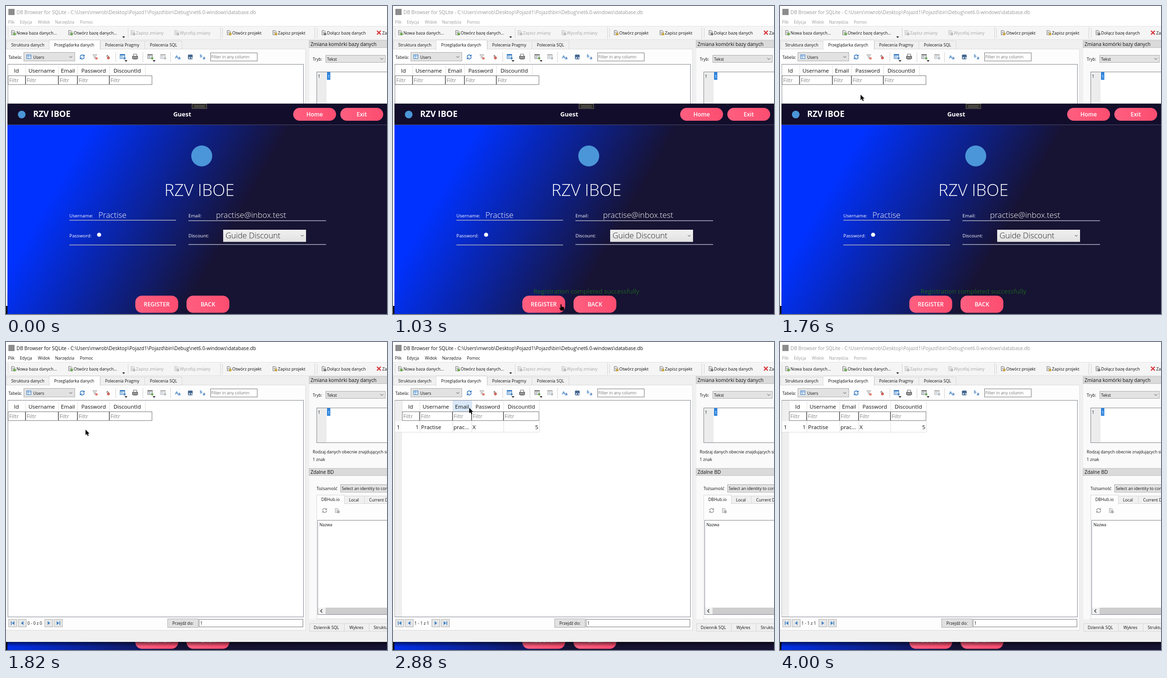
Animation of 800 by 647 pixels, one loop 4.03 s. Source, as an HTML page:

```html
<!DOCTYPE html>
<html lang="pl">
<head>
<meta charset="utf-8">
<title>Registration demo</title>
<style>
html, body { margin: 0; width: 100%; height: 100%; overflow: hidden; background: #f0f0f0; }
svg { display: block; width: 100vw; height: 100vh; font-family: "Open Sans", "Noto Sans", sans-serif; }
text { white-space: pre; }
</style>
</head>
<body>
<svg id="stage" viewBox="0 0 800 647" preserveAspectRatio="none"></svg>
<script>
const INK = '#111', MUTE = '#a2a2a2', LINE = '#828790', SOFT = '#d4d4d4', BLUE = '#3b7fc4', FACE = '#f0f0f0';
const NAME = 'Practise', BRAND = 'RZV IBOE';

const text = (x, y, s, size = 8.7, fill = INK, more = '') =>
  `<text x="${x}" y="${y}" font-size="${size}" fill="${fill}" ${more}>${s}</text>`;
const rect = (x, y, w, h, fill, stroke = 'none', rx = 0) =>
  `<rect x="${x}" y="${y}" width="${w}" height="${h}" fill="${fill}" stroke="${stroke}" rx="${rx}"/>`;
const path = (d, stroke, width = 1, fill = 'none') =>
  `<path d="${d}" stroke="${stroke}" stroke-width="${width}" fill="${fill}"/>`;
const circle = (x, y, r, fill) => `<circle cx="${x}" cy="${y}" r="${r}" fill="${fill}"/>`;
const group = (id, body) => `<g id="${id}">${body}</g>`;
const chevron = (x, y) => path(`M${x - 3} ${y - 1.5}l3 3 3-3`, '#444');
const drop = (x, y) => path(`M${x - 3} ${y}h6l-3 3z`, 'none', 0, INK);
const MID = 'text-anchor="middle"', BOLD = 'font-weight="700"';

// Toolbar glyphs: a sheet with a badge, a grid with a badge
const sheet = (x, y, badge, line = '#777') =>
  path(`M${x + 1.5} ${y + .5}h5l2 2v7h-7z`, line, 1, '#eee') + path(`M${x + 3} ${y + 4}h4m-4 2h4`, line, .7) +
  circle(x + 8, y + 8, 2.8, badge);
const grid = (x, y, tone, badge) =>
  rect(x - 5.5, y - 5.5, 10, 9, '#e8f0f8', tone) + rect(x - 5, y - 5, 9, 2, tone) +
  path(`M${x - 5} ${y}h9M${x - 2} ${y - 3}v6`, tone, .7) + circle(x + 4, y + 3, 2.4, badge);
const refresh = (x, y, c) =>
  path(`M${x - 4} ${y}a4 4 0 0 1 7-3m1 3a4 4 0 0 1-7 3`, c, 1.7) +
  path(`M${x + 5} ${y - 5.5}v4.5h-4.5zM${x - 5} ${y + 5.5}v-4.5h4.5z`, 'none', 0, c);

function titleBar() {
  const file = 'C:\\Users\\mwrob\\Desktop\\Pojazd1\\Pojazd\\bin\\Debug\\net6.0-windows\\database.db';
  const menu = [[4, 'Plik'], [29, 'Edycja'], [67, 'Widok'], [103, 'Narzędzia'], [155, 'Pomoc']];
  return rect(0, 0, 800, 43, '#fff') + rect(5, 6, 13, 13, '#8c8c8c') +
    group('title', text(22, 17, 'DB Browser for SQLite - ' + file, 10.15, 'inherit') +
      menu.map(([x, s]) => text(x, 37, s, 8.7, 'inherit')).join(''));
}

function toolBar() {
  const items = [[22, 'Nowa baza danych...', '#6aa84f'], [142, 'Otwórz bazę danych...', '#6aa84f'],
    [273, 'Zapisz zmiany'], [365, 'Wycofaj zmiany'], [475, 'Otwórz projekt', '#c9a53c'],
    [571, 'Zapisz projekt', '#c9a53c'], [674, 'Dołącz bazę danych', '#777']];
  return rect(0, 43, 800, 28, '#f5f5f5') + path('M0 70.5H800M0 42.5H800', '#e2e2e2') +
    items.map(([x, s, badge]) => sheet(x - 12, 51, badge || '#bbb', badge ? '#777' : '#bbb') +
      text(x, 60, s, 8.9, badge ? INK : MUTE)).join('') +
    drop(247, 64) + path('M450.5 44V69M648.5 44V69', SOFT) +
    path('M4.5 46V67M256.5 46V67M454.5 46V67M653.5 46V67', SOFT, 1) +
    path('M779 52l8 8m0-8l-8 8', '#d8333a', 2.4) + text(790, 60, 'Za', 8.9);
}

function tabs() {
  const idle = [[0, 90, 'Struktura danych', 11], [198, 93, 'Polecenia Pragmy', 208], [291, 78, 'Polecenia SQL', 302]];
  return rect(0, 71, 800, 559, FACE) + rect(-1, 90.5, 630, 515, '#fdfdfd', '#dcdcdc') +
    idle.map(([x, w, s, tx]) => rect(x + .5, 73.5, w, 17, FACE, '#d9d9d9') + text(tx, 85, s)).join('') +
    rect(90.5, 71.5, 107, 20, '#fdfdfd', '#d9d9d9') + rect(91, 90, 106, 3, '#fdfdfd') +
    text(101, 84.5, 'Przeglądarka danych');
}

function tableBar() {
  return text(5, 110.5, 'Tabela:') +
    `<rect id="combo" x="37.5" y="97.5" width="107" height="18" fill="#e2e2e2" stroke="#adadad"/>` +
    rect(43.5, 102.5, 9, 8, '#e8f1fa', BLUE) + path('M44 105h9M47 103v8', BLUE, .8) +
    text(57, 110.5, 'Users') + chevron(136, 107) +
    group('hot', rect(147, 94, 26, 26, '#e4effa')) + refresh(160, 107, BLUE) +
    path('M182 102h9l-3 4v5l-3-2v-3z', '#aaa', 1, '#ddd') + circle(190, 110, 2.5, '#e07a70') +
    path('M210 106l3-4 3 4z', 'none', 0, '#999') + circle(215, 109, 3, '#c9665c') +
    grid(245, 107, BLUE, '#5a8fc8') + drop(252, 114) +
    rect(265.5, 105.5, 11, 5, '#999', '#555') + path('M267.5 105v-4h7v4M267 112h8', '#666') +
    grid(303, 107, '#888', '#6aa84f') + drop(311, 114) + grid(330, 107, '#bbb', '#bbb') +
    path('M230.5 97V118M287.5 97V118M345.5 97V118', SOFT) +
    text(355, 110, 'A', 9.5, BLUE, BOLD) + text(361, 112, 'a', 9, '#2f6fb4', BOLD) +
    rect(382, 102, 10, 10, '#47688f', 'none', 2) + circle(385, 109, 1.8, '#cde') + circle(390, 109, 1.8, '#cde') +
    text(407, 108, 'b', 8, BLUE, BOLD) + text(413, 112, 'a', 9, '#2f6fb4', BOLD) +
    rect(429.5, 98.5, 98, 17, '#fff', '#7a7a7a') + text(431, 110, 'Filter in any column', 8.75, '#757575');
}

function columns(shift) {
  const heads = [[22, 'Id'], [75, 'Username'], [130, 'Email'], [184, 'Password'], [254.5, 'DiscountId']];
  const edges = [4, 41, 110, 150, 217].map(x => x + shift).concat(307);
  return heads.map(([x, s], i) => {
    const left = edges[i], width = edges[i + 1] - left;
    return text(x + shift, 139.5, s, 11.5, INK, MID) + path(`M${left + .5} 124V146`, '#e2e2e2') +
      rect(left + .5, 146.5, width - 1, 18.5, '#fff', '#777') + text(left + 2.5, 160, 'Filtr', 11.2, '#858585');
  }).join('') + path(`M${292.5 + shift} 124V146`, '#e2e2e2');
}

function filled() {
  return rect(4, 123, 15, 454, '#efefef') + rect(4, 166, 15, 23, '#fbfbfb') +
    group('hover', rect(125, 123, 40, 23, '#d9e8f8')) + columns(15) +
    path('M4 189.5H307M56.5 166V189M125.5 166V189M165.5 166V189M232.5 166V189M307.5 166V189', '#dedede') +
    text(8, 183, '1', 11.5) + text(54, 183, '1', 11.5, INK, 'text-anchor="end"') + text(59, 183, NAME, 11.5) +
    text(127, 183, 'prac...', 11.5) + text(167, 183, 'X', 11.5) + text(305, 183, '5', 11.5, INK, 'text-anchor="end"');
}

function pager() {
  const arrow = (x, dir) => path(`M${x - 2.5 * dir} 586.5v8l${5 * dir}-4z`, 'none', 0, BLUE);
  return [5, 25, 81, 101].map(x => rect(x + .5, 582.5, 17, 16, '#e6e6e6', '#b4b4b4')).join('') +
    arrow(15, -1) + arrow(34, -1) + arrow(90, 1) + arrow(109, 1) +
    path('M11 586.5v8M113 586.5v8', BLUE, 1.5) +
    `<text id="count" x="45" y="594" font-size="8.7" fill="${INK}"></text>` +
    rect(339.5, 581.5, 64, 18, '#e1e1e1', '#adadad') + text(371.5, 594, 'Przejdź do:', 8.7, INK, MID) +
    rect(405.5, 582.5, 218, 16, '#fff', '#7a7a7a') + text(408, 594, '1');
}

function sidePanel() {
  const dock = (y, s) => rect(636.5, y + .5, 170, 15, '#dadada', '#c0c0c0') + text(639.5, y + 12, s, 10.2);
  return rect(637, 88, 163, 517, '#fafafa') + dock(72, 'Zmiana komórki bazy danych') +
    text(644, 114.5, 'Tryb:') + rect(671.5, 103.5, 125, 15, '#e3e3e3', '#adadad') + text(674, 115, 'Tekst') + chevron(789, 111) +
    rect(652.5, 138.5, 160, 73, '#fff', LINE) + rect(653, 139, 20, 72, '#ececec') + text(655, 151, '1') +
    rect(674, 139, 7, 16, '#2d83dc') + text(675.3, 151.5, '1', 9, '#fff') +
    text(644, 234, 'Rodzaj danych obecnie znajdujących się', 8.75) + text(644, 250, '1 znak') + dock(265, 'Zdalne BD') +
    text(652, 311, 'Tożsamość') + rect(702.5, 299.5, 110, 16, '#e3e3e3', '#adadad') + text(705, 311, 'Select an identity to connect') +
    rect(652.5, 339.5, 160, 242, '#fdfdfd', '#dcdcdc') + rect(710.5, 323.5, 42, 16, FACE, '#d9d9d9') + rect(752.5, 323.5, 60, 16, FACE, '#d9d9d9') +
    rect(652.5, 321.5, 58, 19, '#fdfdfd', '#d9d9d9') + rect(653, 339, 57, 3, '#fdfdfd') +
    text(662, 334, 'DBHub.io') + text(720, 335, 'Local') + text(762.5, 335, 'Current Database') +
    refresh(669, 354, '#a5a5a5') + sheet(690, 349, '#aaa', '#aaa') +
    rect(654.5, 374.5, 160, 198, '#fff', LINE) + text(658, 387, 'Nazwa') +
    rect(655, 558, 145, 14, FACE) + rect(671, 558, 129, 14, '#cdcdcd') + path('M664 561.5l-3.5 3.5 3.5 3.5', '#333', 1.4) +
    rect(637, 582, 163, 48, FACE) +
    [[637, 73, 'Dziennik SQL', 646], [710, 52, 'Wykres', 721], [762, 60, 'Struktura BD', 772]]
      .map(([x, w, s, tx]) => rect(x + .5, 591.5, w, 16, FACE, '#d5d5d5') + text(tx, 603, s)).join('');
}

function app() {
  const button = (x, y, w, h, s, size) => rect(x, y, w, h, 'url(#pink)', 'none', Math.min(h / 2, 14)) +
    text(x + w / 2, y + h / 2 + size * .36, s, size, '#fff', MID + ' font-weight="600"');
  const line = (x1, x2, y) => path(`M${x1} ${y}H${x2}`, '#a9adc0', 1.6);
  const label = (x, y, s) => text(x, y, s, 9.8, '#fff', 'font-weight="500"');
  const value = (x, y, s, fill = '#fff') => text(x, y, s, 16.7, fill, 'font-weight="300"');
  return rect(0, 630, 3, 17, '#0b0b12') + rect(3, 205, 797, 442, 'url(#night)') + rect(3, 205, 797, 44, '#120d2b') +
    path('M3 249.5H800', '#4a4868') + rect(390.5, 205.5, 31, 10, '#2b2a28', '#67645a') +
    path('M395 209.5h22M395 212.5h22', '#77756c', 1.2) +
    circle(33, 228, 8, '#4b96d8') + text(57, 233, BRAND, 17.4, '#fff', BOLD) +
    text(370, 232, 'Guest', 13, '#fff', MID + ' ' + BOLD) +
    button(603, 214, 90, 27, 'Home', 12) + button(702, 214, 90, 27, 'Exit', 12) +
    circle(411, 315, 22, '#4b96d8') + text(406, 399, BRAND, 35, '#fff', MID + ' font-weight="300"') +
    label(133, 444, 'Username:') + value(194, 445, NAME) + line(133, 357, 450) +
    label(383, 444, 'Email:') + value(441, 445, 'practise@inbox.test') + line(383, 672, 451) +
    label(133, 486, 'Password:') + circle(195.5, 480.5, 4.3, '#fff') + line(133, 357, 502) +
    label(383, 486, 'Discount:') + rect(456, 470, 174, 25.5, 'url(#field)') + value(461, 488, 'Guide Discount', '#222') +
    chevron(622, 482.5) + line(383, 672, 501) +
    group('done', text(406, 604, 'Registration completed successfully', 13.4, '#1b6420', MID + ' font-weight="500"')) +
    button(271.5, 608.5, 90, 36, 'REGISTER', 12) + button(379, 608.5, 90, 36, 'BACK', 12);
}

const $ = id => document.getElementById(id);
$('stage').innerHTML = `<defs>
  <linearGradient id="night" gradientUnits="userSpaceOnUse" x1="180" y1="250" x2="497" y2="431">
    <stop stop-color="#0032ff"/><stop offset="1" stop-color="#171333"/></linearGradient>
  <linearGradient id="pink"><stop stop-color="#ff5f80"/><stop offset="1" stop-color="#fc4d70"/></linearGradient>
  <linearGradient id="field" x2="0" y2="1"><stop stop-color="#f0f0f0"/><stop offset="1" stop-color="#e2e2e2"/></linearGradient>
  <linearGradient id="fade" x2="0" y2="1"><stop stop-opacity=".55"/><stop offset="1" stop-opacity="0"/></linearGradient>
  <clipPath id="front"><rect id="cut" width="800" height="647"/></clipPath></defs>` +
  titleBar() + toolBar() + tabs() + tableBar() +
  rect(4, 122.5, 620.5, 455, '#fff', LINE) + group('empty', columns(0)) + group('full', filled()) +
  pager() + sidePanel() + group('hint', text(2, 623, 'Ten przycisk odświeża dane w obecnie zaznaczonej tabeli.')) +
  `<g clip-path="url(#front)">${app()}</g>` + group('shade', rect(0, 630, 800, 10, 'url(#fade)')) +
  '<path id="cursor" fill="#000"/>';

const LOOP = 4030;
const ARROW = 'M0 0v11.5l2.7-2.4 2 4.4 1.9-.9-2-4.2h3.7z';
const HAND = 'M0 0q1.5-1 2 .5v4l5 1.5q1 1 .5 3l-1 4h-6l-3-5q0-1.5 1.5-1l1 1z';
// time, x, y of the pointer tip: in from the lower right, out the same way
const TRACK = [[250, 790, 660], [700, 362, 633], [1000, 352, 630], [1390, 339, 453],
  [1730, 170, 187], [1820, 167, 184], [1950, 165, 180], [2180, 141, 106], [2270, 159, 103],
  [2560, 159, 103], [2850, 159, 137], [2930, 162, 141], [3330, 790, 660]];

function pointer(t) {
  const i = TRACK.findIndex(p => p[0] > t);
  if (i < 1) return [0, -40];
  const [t0, x0, y0] = TRACK[i - 1], [t1, x1, y1] = TRACK[i];
  const k = (t - t0) / (t1 - t0), e = k * k * (3 - 2 * k);
  return [x0 + (x1 - x0) * e, y0 + (y1 - y0) * e];
}

const show = (id, on) => $(id).setAttribute('visibility', on ? 'visible' : 'hidden');
const set = (id, attr, value) => $(id).setAttribute(attr, value);

function draw(now) {
  const t = now % LOOP, between = (a, b) => t >= a && t < b;
  const dbFront = t >= 1780, loaded = t >= 2450, comboHot = between(2130, 2320);
  const [x, y] = pointer(t);
  const overButton = y > 608 && y < 645 && x > 271 && x < 469;
  set('cut', 'y', dbFront ? 630 : 205);
  show('shade', dbFront);
  set('title', 'fill', between(1780, 3940) ? INK : '#999');
  show('done', between(1000, 1780));
  show('empty', !loaded);
  show('full', loaded);
  $('count').textContent = loaded ? '1 - 1 z 1' : '0 - 0 z 0';
  show('hover', loaded && x > 125 && x < 166 && y > 123 && y < 146);
  // Sub-groups inherit the table's state, so hide the hover cell with it
  show('hot', between(2230, 2700));
  show('hint', between(2230, 2700));
  set('combo', 'fill', comboHot ? '#dcebf8' : '#e2e2e2');
  set('combo', 'stroke', comboHot ? '#4f93cf' : '#adadad');
  set('cursor', 'd', overButton ? HAND : ARROW);
  set('cursor', 'transform', `translate(${x} ${y})`);
  requestAnimationFrame(draw);
}
draw(performance.now());
</script>
</body>
</html>
```
